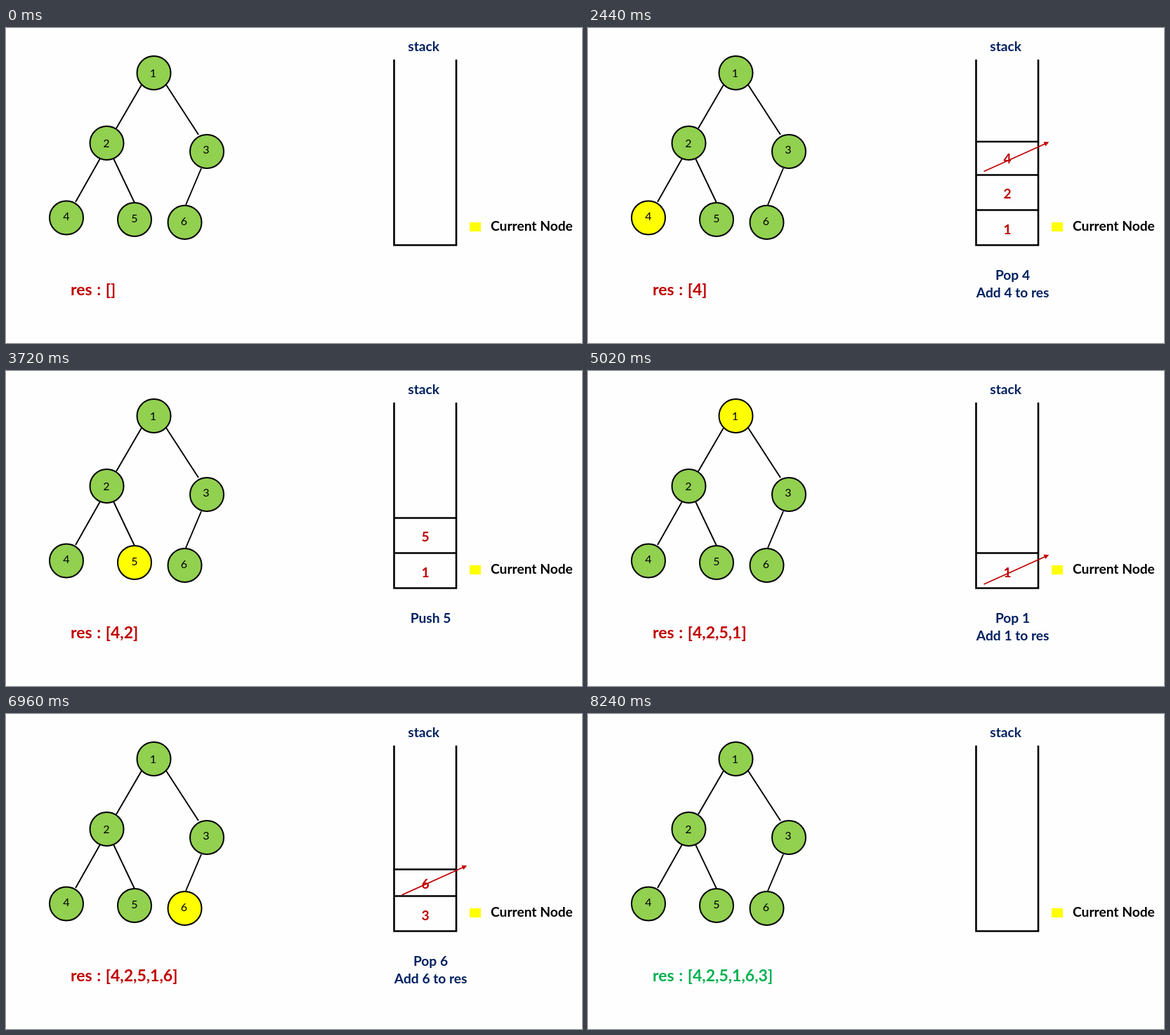
These frames come from a looping animation (820x449 px, 8880 ms). An HTML page:

```html
<!DOCTYPE html>
<html lang="en">
<head>
<meta charset="utf-8">
<title>Inorder traversal with a stack</title>
<style>
  html, body { margin: 0; width: 100%; height: 100%; overflow: hidden; background: #fefefe; }
  svg { display: block; width: 820px; height: 449px; }
  text { font: bold 19.2px Lato, Carlito, sans-serif; text-anchor: middle; }
  .edge { stroke: #000; stroke-width: 1.9; }
  .node circle { fill: #92d050; stroke: #000; stroke-width: 2; }
  .node.current circle { fill: #ff0; }
  .node text { font-weight: 400; font-size: 16px; }
  .wall { fill: none; stroke: #000; stroke-width: 2.6; }
  .navy { fill: #002060; }
  .red { fill: #c00000; }
  .left { text-anchor: start; }
  #res { font-size: 23px; word-spacing: 1px; }
  #res.done { fill: #00b050; }
  .arrow { stroke: #c00000; stroke-width: 1.8; }
</style>
</head>
<body>
<svg viewBox="0 0 820 449">
  <g id="tree"></g>
  <text class="navy" x="594.7" y="33">stack</text>
  <path class="wall" d="M552.5 45V309.5H641V45"/>
  <g id="stack"></g>
  <rect x="660" y="277" width="16" height="13" fill="#ff0"/>
  <text class="left" x="690" y="288.5">Current Node</text>
  <g id="caption"></g>
  <text id="res" class="red left" x="92" y="381"></text>
</svg>
<script>
const LOOP = 8880;
const $ = id => document.getElementById(id);

// [centre x, centre y, label x, label y]
const nodes = [
  [210.5, 64, 209.5, 64.5], [143.5, 164, 143, 164], [286, 176, 285, 173.5],
  [86, 270.5, 86, 268.5], [183, 273, 183, 271.5], [254.5, 277, 253.5, 275]
];
const edges = [
  [193, 81, 157, 143], [228, 81, 274, 152], [134, 186, 99, 248],
  [153, 186, 183, 249], [278, 200, 256, 252]
];

// [start time, operation, node]
const steps = [
  [0, 'start'], [460, 'Push', 1], [1120, 'Push', 2], [1780, 'Push', 4],
  [2440, 'Pop', 4], [3060, 'Pop', 2], [3720, 'Push', 5], [4380, 'Pop', 5],
  [5020, 'Pop', 1], [5660, 'Push', 3], [6320, 'Push', 6], [6960, 'Pop', 6],
  [7600, 'Pop', 3], [8240, 'done']
];

// Stack cells from the bottom up; node 6 sits in a lower cell
const cells = [
  { top: 259.5, label: 287.5, arrow: 304 },
  { top: 209.5, label: 236.5, arrow: 252.5 },
  { top: 162, label: 186, arrow: 204.5 }
];
const lowCell = { top: 221.5, label: 242.5, arrow: 258 };

const text = (x, y, cls, s) => `<text class="${cls}" x="${x}" y="${y}">${s}</text>`;
const line = (x1, y1, x2, y2, cls) =>
  `<line class="${cls}" x1="${x1}" y1="${y1}" x2="${x2}" y2="${y2}"/>`;

function arrow(y) {
  return line(563.5, y, 651, y - 39.5, 'arrow') +
    `<path class="red" transform="translate(656.3 ${y - 42}) rotate(-24.3)" d="M0 0L-7 -3.4V3.4Z"/>`;
}

function drawStack(stack, popping) {
  return stack.map((n, i) => {
    const cell = n === 6 ? lowCell : cells[i];
    const struck = popping && i === stack.length - 1;
    return line(552.5, cell.top, 641, cell.top, 'wall') +
      text(597, cell.label + 6.7, 'red', n) + (struck ? arrow(cell.arrow) : '');
  }).join('');
}

function drawCaption(op, n, early) {
  if (op === 'Push') return text(early ? 601 : 604.5, early ? 364 : 358.5, 'navy', `Push ${n}`);
  if (op === 'Pop') return text(604.5, 358.5, 'navy', `Pop ${n}`) +
    text(604.7, 383.5, 'navy', `Add ${n} to res`);
  return '';
}

// Run the operations once, keeping the picture of each step
const stack = [], res = [];
const scenes = steps.map(([time, op, n], i) => {
  if (op === 'Push') stack.push(n);
  if (op === 'Pop') res.push(n);
  const scene = {
    time, current: n, done: op === 'done', res: `res : [${res}]`,
    stack: drawStack(stack, op === 'Pop'), caption: drawCaption(op, n, i < 4)
  };
  if (op === 'Pop') stack.pop();
  return scene;
});

$('tree').innerHTML = edges.map(e => line(...e, 'edge')).join('') +
  nodes.map(([x, y, tx, ty], i) =>
    `<g class="node"><circle cx="${x}" cy="${y}" r="24"/>${text(tx, ty + 5.6, '', i + 1)}</g>`).join('');
const circles = document.querySelectorAll('.node');

let shown;
function show(scene) {
  if (scene === shown) return;
  shown = scene;
  circles.forEach((c, i) => c.classList.toggle('current', i + 1 === scene.current));
  $('stack').innerHTML = scene.stack;
  $('caption').innerHTML = scene.caption;
  $('res').textContent = scene.res;
  $('res').classList.toggle('done', scene.done);
}

const start = performance.now();
function tick() {
  const t = (performance.now() - start) % LOOP;
  show(scenes.findLast(s => s.time <= t));
  requestAnimationFrame(tick);
}
tick();
</script>
</body>
</html>
```
